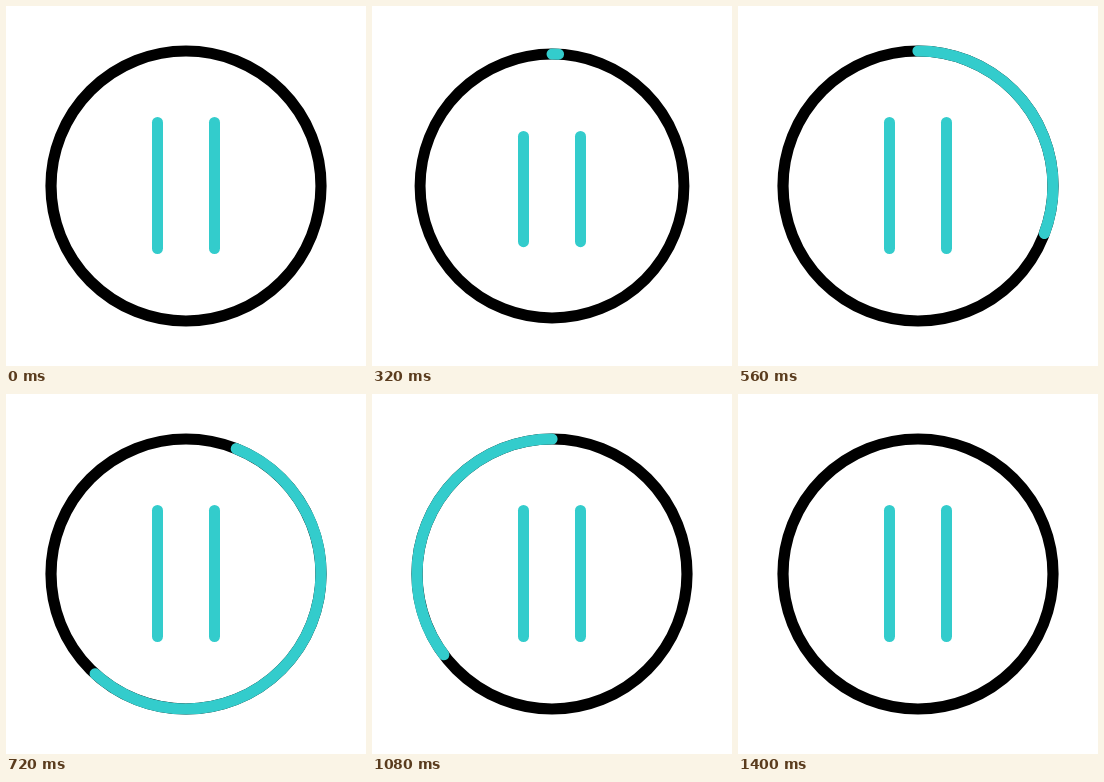
Animation of 360 by 360 pixels, one loop 1.48 s. Source, as an HTML page without scripts:

```html
<!DOCTYPE html>
<html lang="en">
<head>
<meta charset="utf-8">
<title>Pause button</title>
<style>
  /* Loop clock in ms, ticking every 40 ms; every pose is derived from it. */
  @property --time {
    syntax: "<number>";
    inherits: true;
    initial-value: 0;
  }
  @keyframes clock {
    from { --time: 0; }
    to { --time: 1480; }
  }

  html, body {
    margin: 0;
    width: 100%;
    height: 100%;
    overflow: hidden;
    background: #fff;
  }

  svg {
    display: block;
    width: 100%;
    height: 100%;
    fill: none;
    stroke-width: 11.2;
    stroke-linecap: round;
    animation: clock 1480ms steps(37) -2ms infinite;

    /* Linear progress of each phase */
    --press: clamp(0, (var(--time) - 120) / 160, 1);
    --release: clamp(0, (var(--time) - 280) / 160, 1);
    --lead: clamp(0, (var(--time) - 280) / 760, 1);
    --trail: clamp(0, (var(--time) - 600) / 800, 1);

    /* Eased with 3u² - 2u³ */
    --depth: calc(var(--press) * var(--press) * (3 - 2 * var(--press))
                - var(--release) * var(--release) * (3 - 2 * var(--release)));
    --head: calc(var(--lead) * var(--lead) * (3 - 2 * var(--lead)));
    --tail: calc(var(--trail) * var(--trail) * (3 - 2 * var(--trail)));
  }

  .dial {
    transform-origin: 180px 180px;
    transform: scale(calc(1 - 0.027 * var(--depth)));
  }
  .ring { stroke: #000; }
  .arc, .bars { stroke: #33cccc; }
  .arc {
    stroke-dasharray: calc(360px * (var(--head) - var(--tail))) 999px;
    stroke-dashoffset: calc(-360px * var(--tail));
    opacity: clamp(0, (var(--head) - var(--tail)) * 1000, 1);
  }
  .bars line {
    stroke-width: 11;
    stroke-dasharray: calc(126.4px - 25px * var(--depth)) 999px;
    stroke-dashoffset: calc(-16.6px * var(--depth));
  }
</style>
</head>
<body>
<svg viewBox="0 0 360 360">
  <g class="dial">
    <circle class="ring" cx="180" cy="180" r="135"/>
    <circle class="arc" cx="180" cy="180" r="135" pathLength="360" transform="rotate(-90 180 180)"/>
  </g>
  <g class="bars">
    <line x1="151.5" y1="116.4" x2="151.5" y2="242.6"/>
    <line x1="208.5" y1="116.4" x2="208.5" y2="242.6"/>
  </g>
</svg>
</body>
</html>
```
